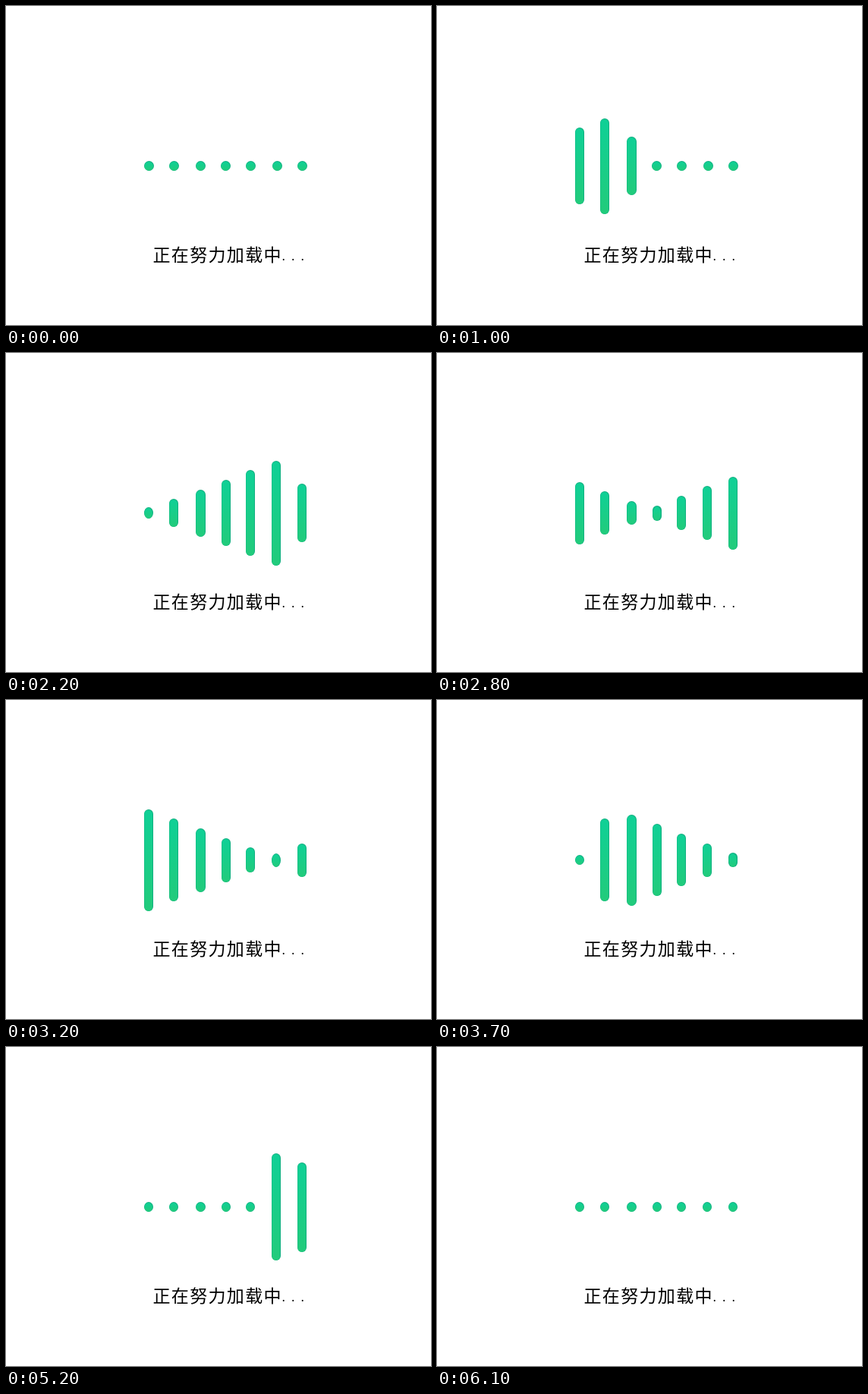
An HTML page for the animation above (6.2 s loop, 560x420 px).

```html
<!DOCTYPE html>
<html lang="zh-CN">
<head>
<meta charset="utf-8">
<title>Loading</title>
<style>
  html, body { margin: 0; width: 100%; height: 100%; overflow: hidden; background: #fff; }
  svg { display: block; width: 560px; height: 420px; }
  text { font-family: "Noto Sans CJK SC", "Noto Sans CJK", sans-serif; fill: #000; }
  .label { font-size: 23px; letter-spacing: 1.33px; }
  .ellipsis { font-size: 16px; }
</style>
</head>
<body>
<svg viewBox="0 0 560 420">
  <defs>
    <linearGradient id="green" x1="0" y1="0" x2="0" y2="1">
      <stop offset="0" stop-color="#0fd096"/>
      <stop offset="1" stop-color="#22cb7b"/>
    </linearGradient>
  </defs>
  <g id="bars"></g>
  <text class="label" x="193.5" y="336">正在努力加载中</text>
  <text class="ellipsis" x="363.4 376 388.6" y="335">...</text>
</svg>
<script>
const TICK = 100, TICKS = 62;
const REST = 13, PEAK = 142, MIDDLE = 211;
const RAMP = 32;               // growth per tick when a bar pops up or collapses
const FALL = 36, FALL_LAG = 4; // tick at which the first bar is down, delay per bar

const barX = [182, 215, 250, 284, 316, 350, 384];
const dotX = [182, 215, 250, 283, 316, 351, 384];
const riseAt = [0, 4, 8, 12, 16, 16, 20];

const group = document.getElementById("bars");

function addRect(fill) {
  const rect = document.createElementNS("http://www.w3.org/2000/svg", "rect");
  rect.setAttribute("fill", fill);
  return group.appendChild(rect);
}

function place(rect, x, y, width, height) {
  const rx = width / 2;
  const ry = height < 19 ? height / 2 : rx;
  for (const [name, value] of Object.entries({ x, y, width, height, rx, ry })) {
    rect.setAttribute(name, value);
  }
}

const clamp = (value, low, high) => Math.min(high, Math.max(low, value));

// Distance travelled by the V-shaped wave; it runs faster between the two sweeps
function travel(tick) {
  const slow = 7.45 * Math.min(tick - 24, 0);
  const fast = 13.1 * clamp(tick - 24, 0, 8.5);
  const late = 6.6 * Math.max(tick - 32.5, 0);
  return slow + fast + late;
}

// Each bar shrinks to its valley and grows again, between a quick rise and a quick fall
function heightAt(i, tick) {
  const valley = 59.4 + 25.3 * (i - 3);
  const wave = REST + Math.abs(travel(tick) - valley);
  const rise = REST + RAMP * (tick - riseAt[i]);
  const fall = REST + RAMP * (FALL + FALL_LAG * i - tick);
  return Math.round(clamp(Math.min(wave, rise, fall), REST, PEAK));
}

const bars = barX.map(() => ({ edge: addRect("#12b081"), face: addRect("url(#green)") }));

function draw(tick) {
  bars.forEach(({ edge, face }, i) => {
    const waiting = tick <= riseAt[i];
    const x = waiting ? dotX[i] : barX[i];
    const w = waiting || i === 2 ? 13 : 12;
    const h = heightAt(i, tick);
    const y = Math.floor(MIDDLE - h / 2);
    place(edge, x, y, w, h);
    place(face, x + .4, y + 1, w - 1.4, h - 1.2);
  });
}

let start, shown = -1;
function loop(now) {
  start ??= now;
  const tick = Math.floor((now - start) / TICK) % TICKS;
  if (tick !== shown) draw(shown = tick);
  requestAnimationFrame(loop);
}
draw(0);
requestAnimationFrame(loop);
</script>
</body>
</html>
```
